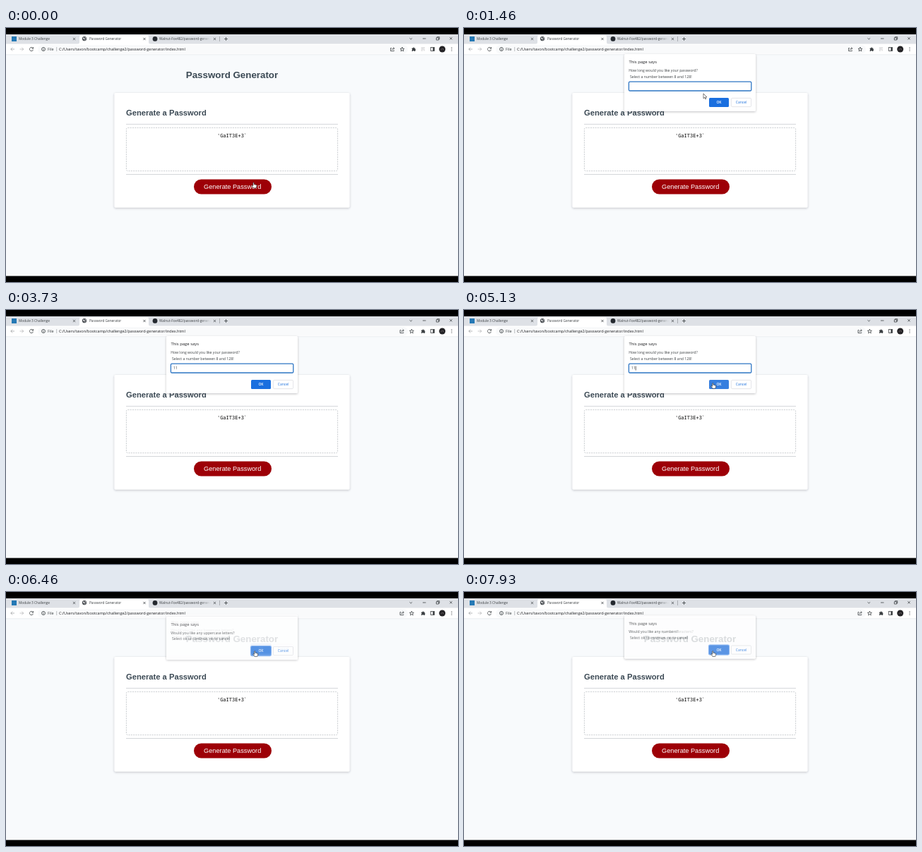
Write an HTML page that moves like this. It is 640 px wide and 360 px high and loops after 8 s.

```html
<!DOCTYPE html>
<html lang="en">
<head>
<meta charset="utf-8">
<title>Password Generator</title>
<style>
html, body { margin: 0; width: 100%; height: 100%; overflow: hidden; background: #000; }
svg { display: block; width: 100%; height: 100%; }
text { white-space: pre; }
.ui { font-family: "Open Sans", "Noto Sans", sans-serif; fill: #3c4043; }
.page { font-family: "Liberation Sans", Arial, sans-serif; }
.mid { text-anchor: middle; }
.line { fill: none; stroke: #3c4043; stroke-width: .8; }
.rule { stroke: #c9cdd1; stroke-width: .8; }
</style>
</head>
<body>
<svg viewBox="0 0 640 360">
  <defs>
    <filter id="soft" x="-10%" y="-10%" width="120%" height="130%">
      <feDropShadow dx="0" dy="1" stdDeviation="1.6" flood-color="#26323a" flood-opacity=".3"/>
    </filter>
    <linearGradient id="fade" gradientUnits="userSpaceOnUse" x1="276" x2="290">
      <stop stop-color="#3c4043"/><stop offset="1" stop-color="#3c4043" stop-opacity="0"/>
    </linearGradient>
    <clipPath id="tabClip"><path d="M216 9H290V22H216z"/></clipPath>
    <path id="cross" class="line" d="M-1.6-1.6 1.6 1.6M1.6-1.6-1.6 1.6"/>
  </defs>

  <!-- Tab strip -->
  <path fill="#dee1e6" d="M0 9H640V23H0z"/>
  <path fill="#fff" d="M101 23Q104 23 104 20V13Q104 10 107 10H199Q202 10 202 13V20Q202 23 205 23z"/>
  <g class="ui" font-size="4.75">
    <rect x="8" y="12" width="7" height="7" fill="#2579b5"/>
    <text x="18" y="17">Module 3 Challenge</text>
    <circle cx="111" cy="15.2" r="3.1" fill="#4d5156"/>
    <path d="M109 13.6l2 .5 .4 1.3-1.5.6zM112 13l1.5 1.3-1 .6zM111.4 16.3l1.3.2-.8 1.2z" fill="#fff"/>
    <text x="118" y="17">Password Generator</text>
    <circle cx="211" cy="15.4" r="3.4" fill="#24292f"/>
    <text x="217" y="17" clip-path="url(#tabClip)" style="fill:url(#fade)">Walnut-Fox482/password-generator</text>
  </g>
  <use href="#cross" x="96.5" y="15.5"/><use href="#cross" x="196" y="15.5"/><use href="#cross" x="295.5" y="15.5"/>
  <path class="line" d="M302.5 12V19" stroke-opacity=".4"/>
  <path class="line" d="M309 15.5H314M311.5 13V18M571.5 14.3 573.3 16 575.1 14.3M590 15H594.5"/>
  <path class="line" d="M609.3 13.8H612.6V17H609.3zM610.4 13.6V12.7H613.7V16H612.8"/>
  <use href="#cross" x="630" y="14.8"/>

  <!-- Toolbar -->
  <path fill="#fff" d="M0 22.5H640V38H0z"/>
  <rect x="45" y="24" width="524" height="12.5" rx="6.2" fill="#f9fafb"/>
  <path class="line" stroke-opacity=".45" d="M12 30H6.8M9.2 27.6 6.8 30l2.4 2.4"/>
  <path class="line" stroke-opacity=".35" d="M19.5 30H24.7M22.3 27.6 24.7 30l-2.4 2.4"/>
  <path class="line" d="M37.9 28.2A2.6 2.6 0 1 0 38.5 30.8M38.6 27V29.2H36.4"/>
  <circle class="line" cx="53" cy="30" r="2.5" stroke-width=".7"/>
  <path class="line" d="M53 29.6V31.6M53 28.3V28.9"/>
  <g class="ui" font-size="5.5">
    <text x="59" y="32">File</text>
    <text x="75" y="32" style="fill:#202124">C:/Users/tavon/bootcamp/challenge2/password-generator/index.html</text>
  </g>
  <path class="line" stroke-opacity=".4" d="M71.7 27V33"/>
  <g id="actions">
    <path class="line" stroke-width=".6" d="M546 28.5H544.6V32.6H549.4V31.5M546.2 31.2Q546.5 29 549.5 28.9M548.3 27.4 550 28.9 548.3 30.4"/>
    <path class="line" stroke-width=".7" d="M561 27.1 561.8 29.2 564 29.3 562.3 30.7 562.9 32.9 561 31.6 559.1 32.9 559.7 30.7 558 29.3 560.2 29.2z"/>
    <path fill="#3c4043" d="M574.7 28.5H576.2A1 1 0 0 1 578.2 28.5H579.4V30A1 1 0 0 1 579.4 31.9V33H577.9A.9.9 0 0 0 576.1 33H574.7V31.5A.9.9 0 0 0 574.7 29.9z"/>
  </g>
  <path id="queue" class="line" stroke-opacity=".35" d="M587.8 28H593M587.8 30H591M587.8 32H590M592 29.5V32.5"/>
  <rect class="line" x="601.5" y="27.5" width="5" height="5"/>
  <path fill="#3c4043" d="M604.3 27.5H606.5V32.5H604.3z"/>
  <circle cx="617.7" cy="30" r="4.5" fill="#242326"/>
  <path d="M615.5 31Q617.5 28 620 30.5" stroke="#665e60" fill="none"/>
  <g fill="#3c4043"><circle cx="631" cy="27.9" r=".6"/><circle cx="631" cy="30" r=".6"/><circle cx="631" cy="32.1" r=".6"/></g>

  <!-- Page -->
  <path fill="#f8fafc" d="M0 38H640V351.5H0z"/>
  <path fill="#e3e6e9" d="M0 37.5H640V38.2H0z"/>
  <g class="page" fill="#3b4954" font-weight="bold">
    <text class="mid" x="320" y="71.3" font-size="13.33">Password Generator</text>
    <rect x="153.5" y="92" width="333" height="162.5" rx="2" fill="#fff" filter="url(#soft)"/>
    <text x="170" y="123.8" font-size="11.2">Generate a Password</text>
  </g>
  <path class="rule" d="M170 136.4H470M170 207.5H470"/>
  <rect class="rule" x="170.4" y="141.4" width="299.2" height="61.2" rx="2" fill="#fff" stroke-dasharray="2 1.3" style="stroke:#bcc0c4"/>
  <text class="mid" x="320" y="155.4" font-size="7" font-family="'DejaVu Sans Mono', monospace" fill="#111">'GaIT3E+3`</text>
  <rect x="266" y="214.5" width="110" height="21" rx="10.5" fill="#9d0007"/>
  <text class="page mid" x="320.7" y="228.2" font-size="9.2" fill="#fff">Generate Password</text>

  <g id="dialogs"></g>
  <g id="cursor" stroke="#111" stroke-width=".55" stroke-linejoin="round" fill="#fff">
    <path id="arrow" d="M0 0V6.8L1.6 5.4 2.7 7.8 3.8 7.3 2.7 5H4.9z"/>
    <path id="hand" d="M-.7.7Q0-.5.7.7V3Q1.5 2.4 2 3.2 2.8 2.7 3.2 3.5 4.2 3.2 4.3 4.2V6Q4 7 3.5 8H-.3Q-1.2 6.4-2.4 5 -2.3 4-1.4 4.4L-.7 5z"/>
  </g>
</svg>
<script>
const LOOP = 8000, FADE_IN = 220, FADE_OUT = 170, RISE = 8;
const $ = id => document.getElementById(id);
const clamp = v => Math.min(1, Math.max(0, v));

const confirmHint = 'Select ok to continue, no to cancel';
const ask = what => `Would you like any ${what}?`;
const dialogs = [
  { from: 790, to: 5230, prompt: true, lines: ['How long would you like your password?', 'Select a number between 8 and 128!'] },
  { from: 5230, to: 6350, lines: [ask('lowercase letters'), confirmHint] },
  { from: 6350, to: 7040, lines: [ask('uppercase letters'), confirmHint] },
  { from: 7040, to: 7855, lines: [ask('special characters'), confirmHint] },
  { from: 7855, to: LOOP, lines: [ask('numbers'), confirmHint] }
];

function dialogMarkup({ prompt, lines }) {
  const top = prompt ? 99 : 79;
  const field = `<rect x="233.4" y="76.2" width="173.4" height="12.8" rx="1.6" fill="#fff" stroke="#2d75c4" stroke-width="1.3"/>
    <text class="entry" x="237" y="84.2" font-size="5.2"></text>
    <path class="caret" stroke="#222" stroke-width=".7" d="M0 79.5V85.5"/>`;
  const ring = `<rect x="345.9" y="${top - 1.1}" width="30.2" height="15.2" rx="2.4" fill="#79abf0"/>`;
  return `<g class="ui">
    <rect x="227" y="37" width="186" height="${top - 18}" rx="1.8" fill="#fff" filter="url(#soft)"/>
    <text x="233.5" y="50" font-size="5.9" style="fill:#202124">This page says</text>
    <text x="233.2" y="${prompt ? 62 : 61.6}" font-size="5.17">${lines[0]}</text>
    <text x="235" y="${prompt ? 70.5 : 70}" font-size="5.17">${lines[1]}</text>
    ${prompt ? field : ring}
    <rect class="ok" x="347" y="${top}" width="28" height="13" rx="1.5"/>
    <rect x="378.4" y="${top + .4}" width="28.2" height="12.2" rx="1.5" fill="#fff" stroke="#dadce0" stroke-width=".7"/>
    <g class="mid" font-size="5" font-weight="600">
      <text x="361" y="${top + 8.3}" style="fill:#fff">OK</text>
      <text x="392.5" y="${top + 8.3}" style="fill:#1a6fdc;font-weight:500">Cancel</text>
    </g></g>`;
}

$('dialogs').innerHTML = dialogs.map(dialogMarkup).join('');
dialogs.forEach((d, i) => {
  d.node = $('dialogs').children[i];
  d.ok = d.node.querySelector('.ok');
});
const entry = document.querySelector('.entry'), caret = document.querySelector('.caret');

// Pointer stops: time, x, y
const stops = [
  [0, 350.5, 218.8], [300, 350.5, 218.8], [650, 349, 220], [1260, 349, 220],
  [1460, 339, 93], [1730, 334, 91], [3760, 334, 91], [4460, 351, 102.5],
  [5130, 352.3, 103.3], [5600, 352.3, 103.3], [5950, 352.3, 83.4], [LOOP, 352.3, 83.4]
];

function pointerAt(t) {
  const i = stops.findIndex(s => s[0] > t);
  const [t0, x0, y0] = stops[i - 1], [t1, x1, y1] = stops[i];
  const p = (t - t0) / (t1 - t0), e = p * p * (3 - 2 * p);
  return [x0 + (x1 - x0) * e, y0 + (y1 - y0) * e];
}

const inside = (x, y, left, top, width, height) =>
  x >= left && x <= left + width && y >= top && y <= top + height;

const show = (node, visible) => node.setAttribute('visibility', visible ? 'visible' : 'hidden');

function caretOn(t) {
  if (t < 2675) return t >= 1930 || (t >= 870 && t < 1400);
  return Math.floor((t - 2675) / 530) % 2 === 0;
}

function draw(t) {
  const [x, y] = pointerAt(t);
  let overButton = inside(x, y, 266, 214.5, 110, 21);

  for (const d of dialogs) {
    const rise = 1 - (1 - clamp((t - d.from) / FADE_IN)) ** 2;
    const alpha = rise * (1 - clamp((t - d.to) / FADE_OUT));
    const hover = inside(x, y, 347, d.prompt ? 99 : 79, 28, 13);
    d.node.setAttribute('opacity', alpha);
    d.node.setAttribute('transform', `translate(0 ${-RISE * (1 - alpha)})`);
    d.ok.setAttribute('fill', hover ? '#377fdf' : '#1a6fdf');
    if (hover && t >= d.from && t < d.to) overButton = true;
  }

  const typed = t < 2460 ? '' : t < 2660 ? '1' : '11';
  entry.textContent = typed;
  caret.setAttribute('transform', `translate(${237.3 + typed.length * 2.97} 0)`);
  caret.setAttribute('opacity', caretOn(t) ? 1 : 0);

  const shifted = t >= 1930;
  $('actions').setAttribute('transform', `translate(${shifted ? 13.4 : 0} 0)`);
  show($('queue'), !shifted);

  // The pointer hides while the user types.
  $('cursor').setAttribute('opacity', t >= 2460 && t < 3760 ? 0 : 1);
  $('cursor').setAttribute('transform', `translate(${x} ${y})`);
  show($('hand'), overButton);
  show($('arrow'), !overButton);
}

function frame() {
  draw(performance.now() % LOOP);
  requestAnimationFrame(frame);
}
frame();
</script>
</body>
</html>
```
